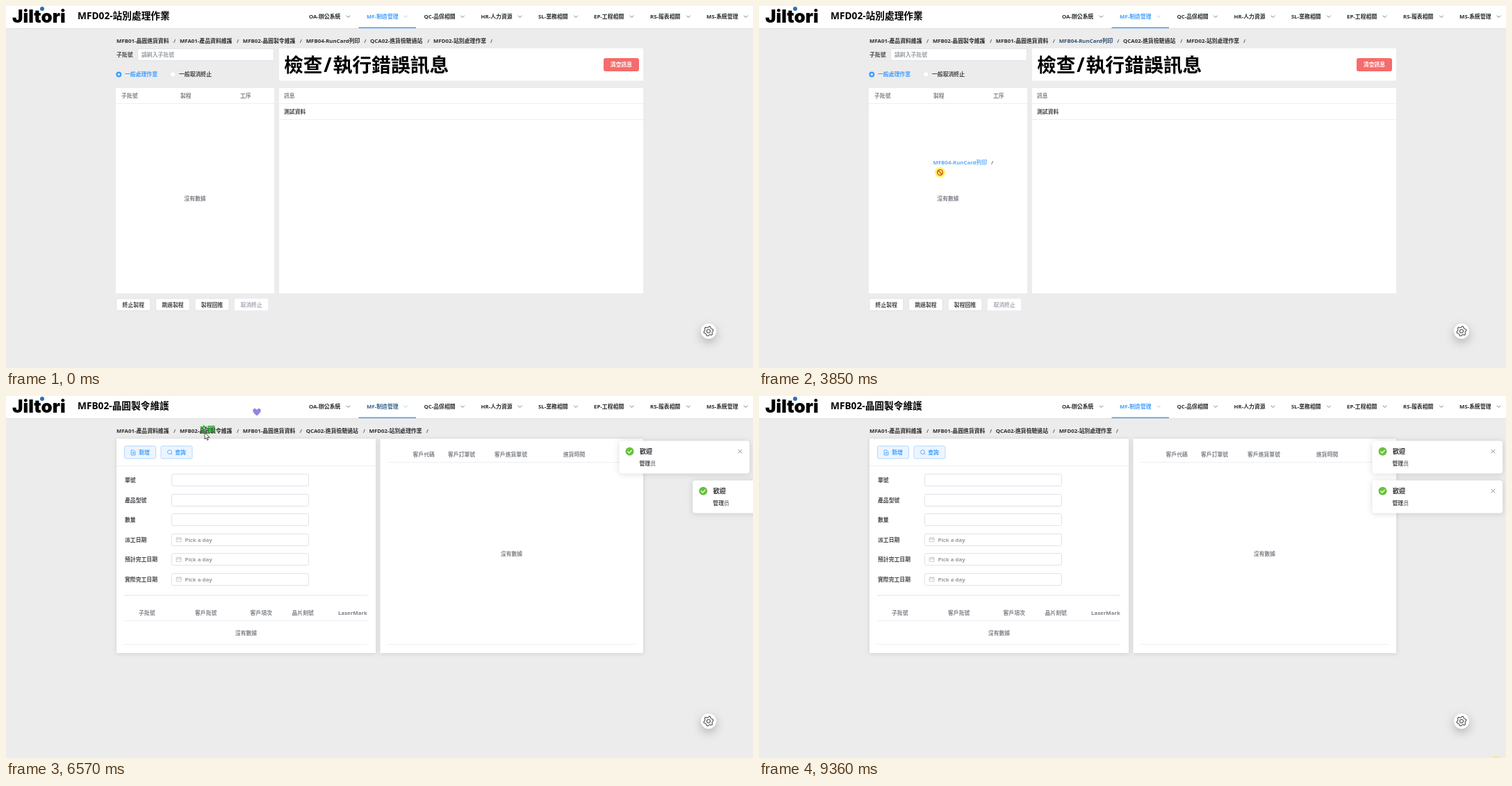
An HTML page that plays this animation: 1075 px wide and 521 px high, repeating every 9420 ms.

```html
<!DOCTYPE html>
<html lang="zh-Hant">
<head>
<meta charset="utf-8">
<title>站別處理作業</title>
<style>
html, body { margin: 0; width: 100%; height: 100%; overflow: hidden; background: #ececec; }
svg { display: block; width: 1075px; height: 521px; }
text { font: bold 7.85px "Noto Sans", "Noto Sans CJK TC", "Noto Sans CJK", sans-serif; white-space: pre; }
.card { filter: drop-shadow(0 1px 3px rgba(0,0,0,.12)); }
.note { filter: drop-shadow(0 1px 4px rgba(0,0,0,.14)); }
.gear { filter: drop-shadow(0 5px 7px rgba(0,0,0,.25)); }
</style>
</head>
<body>
<svg id="stage" viewBox="0 0 1075 521"></svg>
<script>
const LOOP = 9420, BLUE = '#409eff', INK = '#2b2c2f', BODY = '#45474b', GRAY = '#7f8288', HINT = '#999ca3';
const LINE = '#ebeef5', EDGE = '#dfe2e8', RED = '#ff0000';
const stage = document.getElementById('stage');

function el(parent, name, attrs = {}) {
  const node = document.createElementNS('http://www.w3.org/2000/svg', name);
  for (const k in attrs) node.setAttribute(k, attrs[k]);
  return parent.appendChild(node);
}
const group = (p, a) => el(p, 'g', a);
const rect = (p, x, y, x2, y2, fill = '#fff', more = {}) =>
  el(p, 'rect', { x, y, width: x2 - x, height: y2 - y, fill, ...more });
const circle = (p, cx, cy, r, fill, more = {}) => el(p, 'circle', { cx, cy, r, fill, ...more });
const path = (p, d, stroke, width = 1, fill = 'none') =>
  el(p, 'path', { d, stroke, 'stroke-width': width, fill, 'stroke-linecap': 'round', 'stroke-linejoin': 'round' });
const rule = (p, x, x2, y, color = LINE) => rect(p, x, y, x2, y + 1, color);

function text(p, str, x, cy, fill = INK, size = 7.85, anchor = 'start') {
  const node = el(p, 'text', { x, y: cy + size * 0.36, fill, 'text-anchor': anchor });
  node.style.fontSize = size + 'px';
  node.textContent = str;
  return node;
}
function button(p, x, x2, y, y2, label, fill, edge, color, shift = 0) {
  rect(p, x + .5, y + .5, x2 - .5, y2 - .5, fill, { stroke: edge, rx: 2 });
  text(p, label, (x + x2) / 2 + shift, (y + y2) / 2, color, 7.85, 'middle');
}
function input(p, x, x2, cy) {
  const y = Math.round(cy);
  rect(p, x + .5, y - 8.5, x2 - .5, y + 8.5, '#fff', { stroke: EDGE, rx: 2 });
}

// ---- header
rect(stage, 0, 0, 1075, 521, '#ececec');
rect(stage, 0, 32, 1075, 33, '#e0e0e0');
rect(stage, 0, 0, 1075, 32);
const brand = text(stage, 'Jiltori', 9, 14.5, '#000', 26);
brand.style.fontFamily = 'Inter, sans-serif';
brand.style.fontWeight = 900;
circle(stage, 52, 4, 3, '#2f6db5');
const title = text(stage, '', 103, 14.5, '#000', 13.7);
let activeNav;
[['OA-辦公系統', 436, 492.5], ['MF-制造管理', 519, 575], ['QC-品保相關', 601.5, 657], ['HR-人力資源', 683.5, 739.5],
 ['SL-業務相關', 766, 820], ['EP-工程相關', 846, 900.5], ['RS-報表相關', 927, 982], ['MS-系統管理', 1008, 1064.5]
].forEach(([label, x, cx], i) => {
  const node = text(stage, label, x, 15, INK);
  path(stage, `M${cx - 2.5} 14l2.5 2.5l2.5 -2.5`, i === 1 ? '#8cc5ff' : '#606266', .8);
  if (i === 1) activeNav = node;
});
rect(stage, 507.5, 30.5, 590, 32, BLUE);

// ---- station page
const station = group(stage);
text(station, '子批號', 159, 70, BODY);
input(station, 189, 386, 70);
text(station, '請刷入子批號', 195, 70, HINT);
circle(station, 162.3, 98.5, 4, BLUE);
circle(station, 162.3, 98.5, 1.5, '#fff');
text(station, '一般處理作業', 171, 98.5, BLUE);
circle(station, 240.3, 98.5, 3.7, '#fff', { stroke: EDGE, 'stroke-width': .7 });
text(station, '一般取消終止', 249, 98.5, BODY);
rect(station, 393, 61, 917, 107.5);
text(station, '檢查', 400, 84.5, '#000', 27.8);
text(station, '/', 463, 84.5, '#000', 27.8, 'middle');
text(station, '執行錯誤訊息', 470.5, 84.5, '#000', 27.8);
button(station, 860, 911, 75, 94, '清空訊息', '#f56c6c', '#f56c6c', '#fff');
rect(station, 158, 118, 386, 413.5);
rect(station, 393, 118, 917, 413.5);
[['子批號', 166], ['製程', 251], ['工序', 337], ['訊息', 400]].forEach(([s, x]) => text(station, s, x, 129, GRAY));
rule(station, 158, 386, 140);
rule(station, 393, 917, 140);
rule(station, 393, 917, 163);
text(station, '測試資料', 400, 152, BODY);
text(station, '沒有數據', 272, 277.5, GRAY, 7.85, 'middle');
['終止製程', '跳過製程', '製程回推', '取消終止'].forEach((s, i) => {
  const x = 158.3 + i * 56.6;
  button(station, x, x + 50, 420.5, 439, s, '#fff', i < 3 ? EDGE : LINE, i < 3 ? BODY : '#a9adb4');
});

// ---- order page
const order = group(stage);
rect(order, 159, 61.5, 532, 370, '#fff', { class: 'card' });
rect(order, 538.5, 61.5, 917, 370, '#fff', { class: 'card' });
button(order, 170, 216, 71.5, 90.5, '新增', '#ecf5ff', '#b3d8ff', BLUE, 6);
button(order, 222.5, 268.5, 71.5, 90.5, '查詢', '#ecf5ff', '#b3d8ff', BLUE, 5.5);
path(order, 'M180.5 78h3.5l2 2v5h-5.5zM183.2 80.5v3M181.7 82h3', BLUE, .8);
circle(order, 235.5, 80.7, 3, 'none', { stroke: BLUE, 'stroke-width': .8 });
path(order, 'M237.7 82.9l1.2 1.2', BLUE, .8);
rule(order, 159, 532, 100);
['單號', '產品型號', '數量', '派工日期', '預計完工日期', '實際完工日期'].forEach((s, i) => {
  const y = 121.2 + i * 28.5;
  text(order, s, 171, y, BODY);
  input(order, 238, 436, y);
  if (i < 3) return;
  path(order, `M245.5 ${y - 2.5}h6.5v5.5h-6.5zM245.5 ${y - .5}h6.5M247 ${y - 3.5}v1.5M250.5 ${y - 3.5}v1.5`, '#b4b8bf', .7);
  text(order, 'Pick a day', 257.5, y, HINT);
});
rule(order, 170, 520, 286.5, EDGE);
[['子批號', 191], ['客戶批號', 272], ['客戶項次', 351.5], ['晶片刻號', 411.5], ['LaserMark', 478]]
  .forEach(([s, x]) => text(order, s, x, 312, GRAY));
[['客戶代碼', 585.5], ['客戶訂單號', 636], ['客戶進貨單號', 703], ['進貨時間', 802]]
  .forEach(([s, x]) => text(order, s, x, 84, GRAY));
rule(order, 170, 520, 323);
rule(order, 170, 520, 357);
rule(order, 549, 905, 95);
rule(order, 549, 905, 357);
text(order, '沒有數據', 345.5, 341, GRAY, 7.85, 'middle');
text(order, '沒有數據', 727.5, 227, GRAY, 7.85, 'middle');

// ---- settings button
circle(stage, 1011, 468, 11, '#fff', { class: 'gear' });
const teeth = Array.from({ length: 24 }, (_, i) => {
  const a = (i + 1.5) * Math.PI / 12, r = i % 4 === 1 || i % 4 === 2 ? 7 : 5.4;
  return (1011 + r * Math.sin(a)).toFixed(1) + ' ' + (468 + r * Math.cos(a)).toFixed(1);
});
path(stage, 'M' + teeth.join('L') + 'z', '#505256', 1.1);
circle(stage, 1011, 468, 2.5, 'none', { stroke: '#505256', 'stroke-width': 1.1 });

// ---- breadcrumb tags
const labels = ['MFB01-晶圓進貨資料', 'MFA01-產品資料維護', 'MFB02-晶圓製令維護', 'MFB04-RunCard列印', 'QCA02-進貨檢驗過站', 'MFD02-站別處理作業'];
const pitch = i => i === 3 ? 92.4 : 90.9;
function makeTag(p, i) {
  const g = group(p);
  const name = text(g, labels[i], 0, 0, INK);
  text(g, '/', pitch(i) - 7.2, 0, '#606266', 7.85, 'middle');
  return { g, name };
}
const tags = labels.map((_, i) => makeTag(stage, i));

// ---- notifications
const notes = [64.5, 121.5].map(y => {
  const g = group(stage, { class: 'note' });
  rect(g, 882.5, y, 1070, y + 47, '#fff', { rx: 4 });
  circle(g, 897.5, y + 15.3, 6, '#67c23a');
  path(g, `M894.8 ${y + 15.5}l2 2l3.6 -3.8`, '#fff', 1.2);
  text(g, '歡迎', 912, y + 15.3, INK, 9);
  text(g, '管理', 911.5, y + 32.5, BODY);
  text(g, '员', 927.2, y + 32.5, BODY).style.fontWeight = 400;
  path(g, `M1054 ${y + 12.7}l5 5m0 -5l-5 5`, GRAY, .9);
  return g;
});

// ---- trash can
const trash = group(stage);
const hollow = group(trash), solid = group(trash);
path(hollow, 'M21.3 427.5H112.7M31.5 427.5V505.8H102.5V427.5M52.5 427V413.3H81.5V427M56.3 449V485M77.3 449V485', RED, 7);
path(solid, 'M28 427.5H111M57 427V413.3H82V427', RED, 6.5);
path(solid, 'M36 429H103V507.5H36z', RED, 4, RED);
path(solid, 'M59.5 449V485M79 449V485', '#ececec', 6.5);

const ghosts = labels.map((_, i) => {
  const tag = makeTag(stage, i);
  tag.name.setAttribute('fill', BLUE);
  tag.g.setAttribute('opacity', .85);
  return tag.g;
});

// ---- click effects
const word = text(stage, '文明', 0, 0, '#0c980c', 11, 'middle');
const heart = group(stage);
path(heart, 'M0 5C-8 -1 -4.8 -5 -2.4 -4.4Q-.6 -4 0 -2.4Q.6 -4 2.4 -4.4C4.8 -5 8 -1 0 5z', 'none', 0, 'rgb(80,55,205)');

// ---- pointer
const pointer = group(stage);
const glow = circle(pointer, 0, 0, 7.5, '#fff04a', { opacity: .85 });
const arrow = path(pointer, 'M0 0V9.2L2.2 7.2L3.8 10.6L5.2 10L3.7 6.7H6.6z', '#222', .8, '#fff');
const carry = rect(pointer, 2.5, 8, 8, 14, '#fff', { stroke: '#222', 'stroke-width': .8 });
const deny = group(pointer);
circle(deny, 0, 0, 3.9, 'none', { stroke: '#c8501e', 'stroke-width': 1.4 });
path(deny, 'M-2.7 -2.7L2.7 2.7', '#c8501e', 1.4);

// ---- timing tables
const orders = [[0, '012345'], [1456, '102345'], [2100, '120345'], [4520, '12045'], [7820, '1045']];
// start, end, tag, ghost offset, highlight start
const drags = [[1380, 2700, 0, -53, 2, 1100], [3640, 4500, 3, -10, -14, 3790], [7060, 7800, 2, -56, 3, 6880]];
// in, out, filled from
const bins = [[1515, 2750, 1e5], [3855, 5020, 4200], [7070, 8150, 7680]];
const clicks = [[6070, 361, 53], [6490, 286, 53]];
const route = [[360, 932, 407], [1050, 212, 50], [1380, 212, 48], [1610, 286, 46], [2100, 372, 48], [2300, 385, 48],
  [2700, 396, 48], [3230, 432, 60], [3500, 446, 60], [3640, 446, 60], [3850, 261, 239], [4200, 92, 430], [4350, 70, 462],
  [4520, 70, 462], [5010, 430, 194], [5280, 455, 150], [5900, 361, 53], [6100, 361, 53], [6420, 286, 53], [6700, 286, 53],
  [6950, 306, 48], [7060, 306, 48], [7470, 81, 324], [7700, 68, 455], [7850, 68, 455], [8690, 760, 515]];

const clamp = v => Math.max(0, Math.min(1, v));
// CSS "ease"
function ease(v) {
  v = clamp(v);
  let lo = 0, hi = 1, s = .5;
  for (let i = 0; i < 16; i++) {
    s = (lo + hi) / 2;
    if (.75 * s * (1 - s) + s ** 3 < v) lo = s; else hi = s;
  }
  return .3 * s * (1 - s) ** 2 + 3 * s * s * (1 - s) + s ** 3;
}
const tint = k => `rgb(${43 + 21 * k},${44 + 114 * k},${47 + 208 * k})`;
const show = (node, on) => node.setAttribute('visibility', on ? 'inherit' : 'hidden');
const move = (node, x, y, more = '') => node.setAttribute('transform', `translate(${x} ${y})${more}`);

function slot(list, i) {
  let x = 159;
  for (const c of list) {
    if (+c === i) return x;
    x += pitch(+c);
  }
  return null;
}
function tagX(i, t) {
  let x = slot(orders[0][1], i), last = x;
  for (const [at, list] of orders.slice(1)) {
    if (t < at) break;
    const next = slot(list, i);
    if (next === null) return null;
    x += (next - last) * ease((t - at) / 300);
    last = next;
  }
  return x;
}
function pointerAt(t) {
  const i = route.findIndex(k => k[0] > t);
  if (i < 0) return route[route.length - 1].slice(1);
  if (!i) return route[0].slice(1);
  const [a, ax, ay] = route[i - 1], [b, bx, by] = route[i], k = (t - a) / (b - a);
  return [ax + (bx - ax) * k, ay + (by - ay) * k];
}

function render(t) {
  const [first, second] = clicks.map(c => c[0]);
  title.textContent = labels[t < first ? 5 : t < second ? 0 : 2];
  show(station, t < first);
  show(order, t >= first);
  const lastClick = t < first ? -1e3 : t < second ? first : second;
  activeNav.setAttribute('fill', tint(ease((t - lastClick) / 300)));

  const drag = drags.find(d => t >= d[0] && t < d[1]);
  tags.forEach(({ g, name }, i) => {
    const x = tagX(i, t);
    show(g, x !== null);
    if (x !== null) move(g, x, 50);
    const d = drags.find(d => d[2] === i);
    name.setAttribute('fill', tint(d ? ease((t - d[5]) / 300) * (1 - ease((t - d[1] - 100) / 300)) : 0));
  });

  notes.forEach((n, i) => {
    const at = clicks[i][0];
    show(n, t >= at);
    move(n, 193 * (1 - ease((t - at) / 300)), 0);
  });

  const bin = bins.find(b => t >= b[0] && t < b[1] + 190);
  show(trash, bin);
  if (bin) {
    const shown = ease((t - bin[0]) / 400) * (1 - ease((t - bin[1]) / 190));
    move(trash, -120 * (1 - shown), 0);
    show(hollow, t < bin[2]);
    show(solid, t >= bin[2]);
  }

  const corner = t >= 9290;
  const [x, y] = corner ? [1061, 526] : pointerAt(t);
  ghosts.forEach((g, i) => {
    const on = drag && drag[2] === i;
    show(g, on);
    if (on) move(g, x + drag[3], y + drag[4]);
  });
  const allowed = y < 62 || (x < 118 && y > 408);
  move(pointer, x, y);
  show(pointer, corner || (t >= 360 && t < 8690));
  show(glow, drag || corner);
  show(arrow, !corner && (!drag || allowed));
  show(carry, drag && allowed);
  show(deny, drag && !allowed);

  const age = t - first;
  show(heart, age >= 0 && age < 1250);
  move(heart, 361, 53 - age * .06, ` scale(${1 + age * .00024})`);
  heart.setAttribute('opacity', clamp(1 - age * .00078));
  const hit = clicks.find(c => t >= c[0] && t < c[0] + 400);
  show(word, hit);
  if (hit) {
    const k = (t - hit[0]) / 400;
    move(word, hit[1] + 4, hit[2] - 3 - 9 * k);
    word.setAttribute('opacity', 1 - k * k);
  }
}

const start = performance.now();
(function tick() {
  render((performance.now() - start) % LOOP);
  requestAnimationFrame(tick);
})();
</script>
</body>
</html>
```
